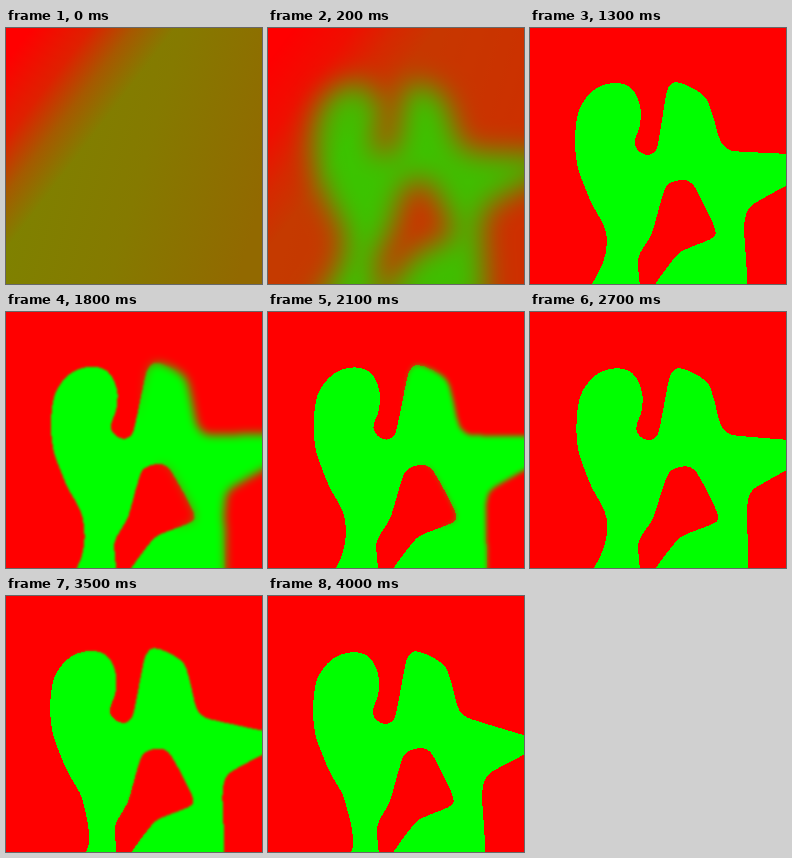
Animation, 256 px wide and 256 px high, one loop 4.1 s. Source, as an HTML page:

```html
<!DOCTYPE html>
<html lang="en">
<head>
<meta charset="utf-8">
<title>Decision boundary</title>
<style>
  html, body { margin: 0; width: 100%; height: 100%; overflow: hidden; background: #f00; }
  svg { display: block; width: 256px; height: 256px; }
  path { fill: #0f0; shape-rendering: crispEdges; }
</style>
</head>
<body>
<svg viewBox="0 0 256 256">
  <defs>
    <filter id="blurLeft" filterUnits="userSpaceOnUse" x="-100" y="-100" width="456" height="456" color-interpolation-filters="sRGB">
      <feGaussianBlur stdDeviation="0"/>
    </filter>
    <filter id="blurRight" filterUnits="userSpaceOnUse" x="-100" y="-100" width="456" height="456" color-interpolation-filters="sRGB">
      <feGaussianBlur stdDeviation="0"/>
    </filter>
    <linearGradient id="fade" gradientUnits="userSpaceOnUse" x1="0" y1="0" x2="50" y2="-15">
      <stop stop-color="#000"/><stop offset="1" stop-color="#fff"/>
    </linearGradient>
    <mask id="rightSide"><rect width="256" height="256" fill="url(#fade)"/></mask>
    <linearGradient id="olive" gradientUnits="userSpaceOnUse" x1="20" y1="100" x2="256" y2="169">
      <stop stop-color="#7e8200"/><stop offset=".5" stop-color="#857a00"/><stop offset="1" stop-color="#926900"/>
    </linearGradient>
    <linearGradient id="corner" gradientUnits="userSpaceOnUse" x1="0" y1="0" x2="107" y2="82">
      <stop offset=".15" stop-color="#f00"/>
      <stop offset=".5" stop-color="#f00" stop-opacity=".75"/>
      <stop offset=".75" stop-color="#f00" stop-opacity=".3"/>
      <stop offset="1" stop-color="#f00" stop-opacity="0"/>
    </linearGradient>
  </defs>
  <rect width="256" height="256" fill="#f00"/>
  <path id="left"/>
  <g mask="url(#rightSide)">
    <rect width="256" height="256" fill="#f00"/>
    <path id="right"/>
  </g>
  <g id="haze">
    <rect width="256" height="256" fill="url(#olive)"/>
    <rect width="256" height="256" fill="url(#corner)"/>
  </g>
</svg>
<script>
const LOOP = 4100, STEP = 100;
const $ = id => document.getElementById(id);

// Key points of the boundary: left leg, head, notch, hump, arm, right leg, gap.
const outline = `48,280 62,256 73,235 77,214 74,198 61,174 48,140 45,112 49,82 64,62 84,55
  101,60 110,78 110,97 105,117 117,127 127,120 137,63 146,54 173,67 182,85 191,114 203,123
  290,128 290,139 222,177 214,199 215,280 115,280 148,226 184,209 184,198 164,158 153,152
  136,159 122,205 108,231 108,280`.split(/\s+/).map(pair => pair.split(',').map(Number));

// Places where the boundary gets pulled, each with a soft radius.
const anchors = {
  foot: { x: 62, y: 256, r: 30 },
  head: { x: 75, y: 95, r: 60 },
  hump: { x: 160, y: 60, r: 40 },
  arm: { x: 290, y: 128, r: 8 },
  leg: { x: 216, y: 215, r: 45 },
  gap: { x: 150, y: 175, r: 40 }
};

// Each pose lists its pulls as [dx, dy]; whatever is missing stays at rest.
const rest = {};
const loose = { foot: [9, 0], hump: [5, -4], arm: [0, -6], leg: [5, 0] };
const resettled = { foot: [2, 0], head: [2, 2], hump: [3, 2], arm: [0, 3], leg: [3, 0], gap: [3, 3] };
const swollen = { foot: [14, 0], head: [-3, -3], hump: [5, -7], arm: [0, 3], leg: [7, 0], gap: [1, 2] };
const final = { foot: [21, 0], head: [0, 2], hump: [2, 1], arm: [0, 21] };

// Blur grows to the right of the fade position.
const keys = [
  { at: 0, pose: rest, left: 30, right: 30, haze: 1 },
  { at: 200, pose: rest, left: 14, right: 14, haze: .45 },
  { at: 400, pose: rest, left: 5, right: 5 },
  { at: 600, pose: rest },
  { at: 1300, pose: rest },
  { at: 1800, pose: loose, left: 1.2, right: 5, fade: 100 },
  { at: 2500, pose: resettled, fade: 100 },
  { at: 2900, pose: resettled, fade: 30 },
  { at: 3200, pose: swollen, left: .3, right: 3, fade: 30 },
  { at: 3700, pose: final, fade: 30 },
  { at: LOOP, pose: final }
];

const mix = (a = 0, b = 0, k) => a + (b - a) * k;

function pulled([x, y], pose) {
  let px = x, py = y;
  for (const [name, [dx, dy]] of Object.entries(pose)) {
    const a = anchors[name];
    const weight = Math.exp(-((x - a.x) ** 2 + (y - a.y) ** 2) / a.r ** 2);
    px += dx * weight;
    py += dy * weight;
  }
  return [px, py];
}

// Closed curve whose short handles round the corners and keep long sides straight.
function smooth(points) {
  const at = i => points[(i + points.length) % points.length];
  const span = (a, b) => Math.hypot(b[0] - a[0], b[1] - a[1]);
  const handle = (i, length) => {
    const before = at(i - 1), after = at(i + 1), scale = length / span(before, after);
    return [0, 1].map(axis => at(i)[axis] + (after[axis] - before[axis]) * scale);
  };
  return 'M' + points[0] + points.map((point, i) => {
    const length = Math.min(span(point, at(i + 1)) / 3, 8);
    return `C${handle(i, length)} ${handle(i + 1, -length)} ${at(i + 1)}`;
  }).join('') + 'Z';
}

function drawShape(id, filterId, path, blur) {
  $(id).setAttribute('d', path);
  $(filterId).firstElementChild.setAttribute('stdDeviation', blur);
  $(id).setAttribute('filter', blur > 0 ? `url(#${filterId})` : 'none');
}

function draw(now) {
  const time = Math.floor(now % LOOP / STEP) * STEP;
  const next = keys.findIndex(key => key.at > time);
  const from = keys[next - 1], to = keys[next];
  const k = (time - from.at) / (to.at - from.at);
  const value = name => mix(from[name], to[name], k);
  const path = smooth(outline.map(point => {
    const a = pulled(point, from.pose), b = pulled(point, to.pose);
    return [mix(a[0], b[0], k), mix(a[1], b[1], k)];
  }));

  drawShape('left', 'blurLeft', path, value('left'));
  drawShape('right', 'blurRight', path, value('right'));
  $('fade').setAttribute('gradientTransform', `translate(${value('fade')})`);
  $('haze').setAttribute('opacity', value('haze'));
}

const start = performance.now();
function tick() {
  draw(performance.now() - start);
  requestAnimationFrame(tick);
}
tick();
</script>
</body>
</html>
```
